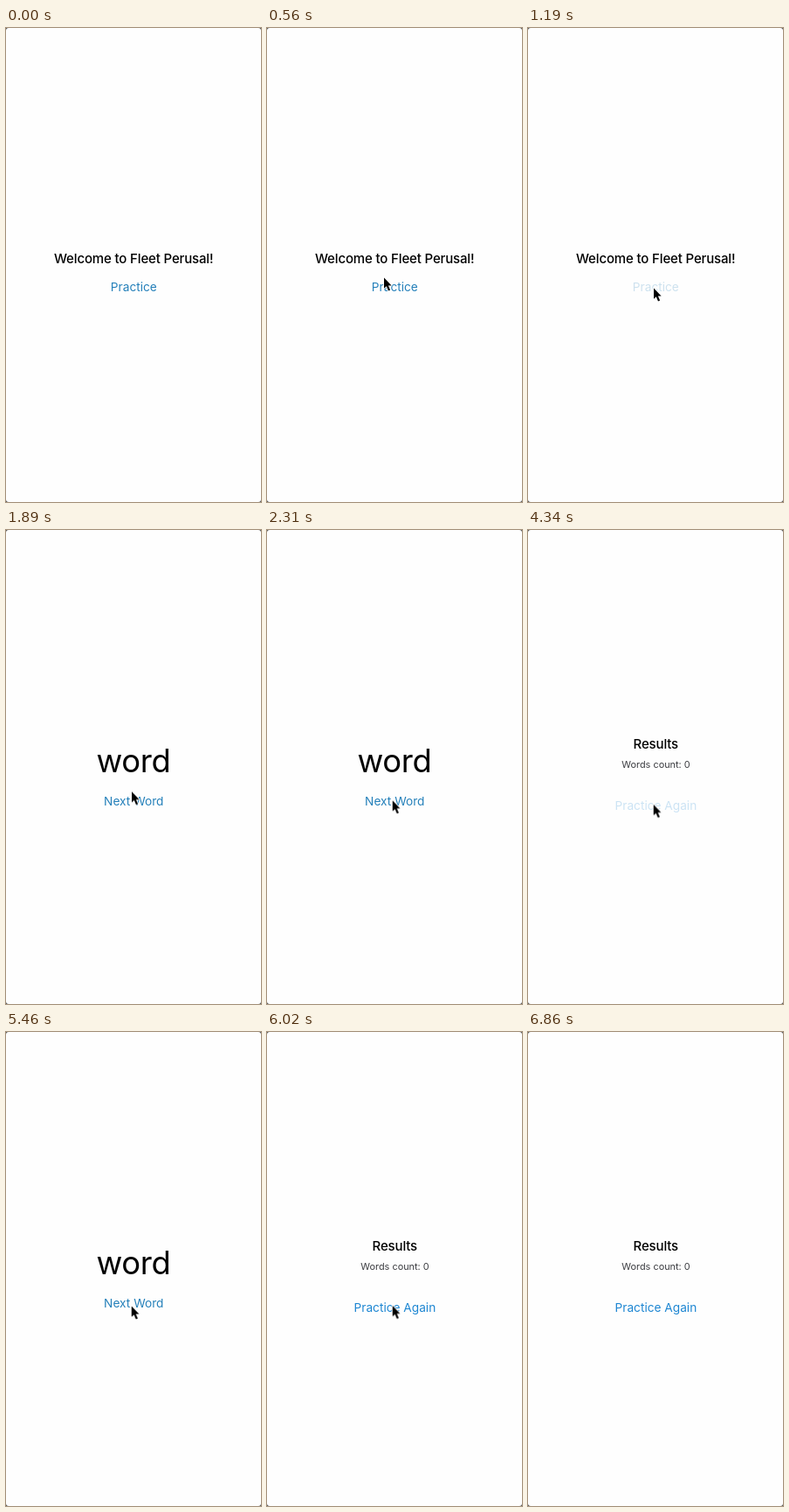
Write an HTML page that moves like this. It is 292 by 542 pixels and loops after 6930 ms.

```html
<!DOCTYPE html>
<html lang="en">
<head>
<meta charset="utf-8">
<title>Reading practice</title>
<style>
  html, body { margin: 0; width: 100%; height: 100%; overflow: hidden; background: #4a4a4a; }
  svg { display: block; width: 100%; height: 100%; }
  text { font-family: Inter, "Open Sans", sans-serif; text-anchor: middle; fill: #000; }
  .link { fill: #2580ba; font-size: 13.7px; }
  #results .link { fill: #1d86d2; }
  .title { font-size: 15px; font-weight: 450; letter-spacing: -.01em; }
  .count { font-size: 10.9px; fill: #3b3c40; }
  .word { font-size: 36.4px; letter-spacing: -.01em; }

  /* One loop is 99 ticks of 70 ms. */
  .screen, .link, #cursor { animation: 6.93s step-end infinite; }
  #welcome { animation-name: welcome; }
  #reading { animation-name: reading; }
  #results { animation-name: results; }
  .link { animation-name: press; }
  #cursor { animation-name: move; }

  @keyframes welcome {
    0% { visibility: visible; }
    18.18%, 100% { visibility: hidden; }
  }
  @keyframes reading {
    0%, 42.42%, 86.86%, 100% { visibility: hidden; }
    18.18%, 63.63% { visibility: visible; }
  }
  @keyframes results {
    0%, 63.63% { visibility: hidden; }
    42.42%, 86.86%, 100% { visibility: visible; }
  }
  @keyframes press {
    0%, 18.18%, 42.42%, 63.63%, 86.86%, 100% { opacity: 1; }
    16.16%, 40.4%, 61.61%, 84.84% { opacity: .5; }
    17.17%, 41.41%, 62.62%, 85.85% { opacity: .22; }
  }
  @keyframes move {
    0% { transform: translate(195px, 570px); }
    1.01% { transform: translate(195px, 503px); }
    2.02% { transform: translate(150px, 440px); }
    3.03% { transform: translate(108px, 376px); }
    4.04% { transform: translate(84px, 322px); }
    5.05% { transform: translate(80px, 287px); }
    6.06% { transform: translate(98px, 271px); }
    7.07% { transform: translate(120px, 274px); }
    8.08% { transform: translate(134px, 284px); }
    9.09% { transform: translate(140px, 292px); }
    10.1% { transform: translate(142.5px, 297px); }
    11.11% { transform: translate(144px, 296px); }
    27.27% { transform: translate(144px, 296px); animation-timing-function: steps(7, start); }
    34.34% { transform: translate(143.7px, 307.8px); }
    55.55% { transform: translate(143.7px, 307.8px); animation-timing-function: steps(4, start); }
    59.59% { transform: translate(143.7px, 312.5px); }
    78.78% { transform: translate(143.7px, 312.5px); animation-timing-function: steps(2, start); }
    80.8% { transform: translate(143.7px, 311.5px); }
    91.91% { transform: translate(143px, 314px); }
    92.92% { transform: translate(142.5px, 323px); }
    93.93% { transform: translate(142.5px, 344px); }
    94.94% { transform: translate(144px, 376px); }
    95.95% { transform: translate(146px, 415px); }
    96.96% { transform: translate(148px, 458px); }
    97.97% { transform: translate(149px, 504px); }
    98.98%, 100% { transform: translate(150px, 570px); }
  }
</style>
</head>
<body>
<svg viewBox="0 0 292 542">
  <rect width="292" height="542" rx="3" fill="#fefefe"/>
  <g id="welcome" class="screen">
    <text class="title" x="146.2" y="268.6">Welcome to Fleet Perusal!</text>
    <text class="link" x="146.3" y="300.5">Practice</text>
  </g>
  <g id="reading" class="screen">
    <text class="word" x="146" y="276.6">word</text>
    <text class="link" x="146.3" y="315">Next Word</text>
  </g>
  <g id="results" class="screen">
    <text class="title" x="146.3" y="250">Results</text>
    <text class="count" x="146.5" y="272.4">Words count: 0</text>
    <text class="link" x="146.4" y="319.6">Practice Again</text>
  </g>
  <path id="cursor" d="M0 1.6V13.8L2.8 11.2L5 16.4L7.1 15.5L4.9 10.4H8.6Z"
        fill="#000" stroke="#fff" stroke-width="1.6" stroke-linejoin="round" paint-order="stroke"/>
</svg>
</body>
</html>
```
